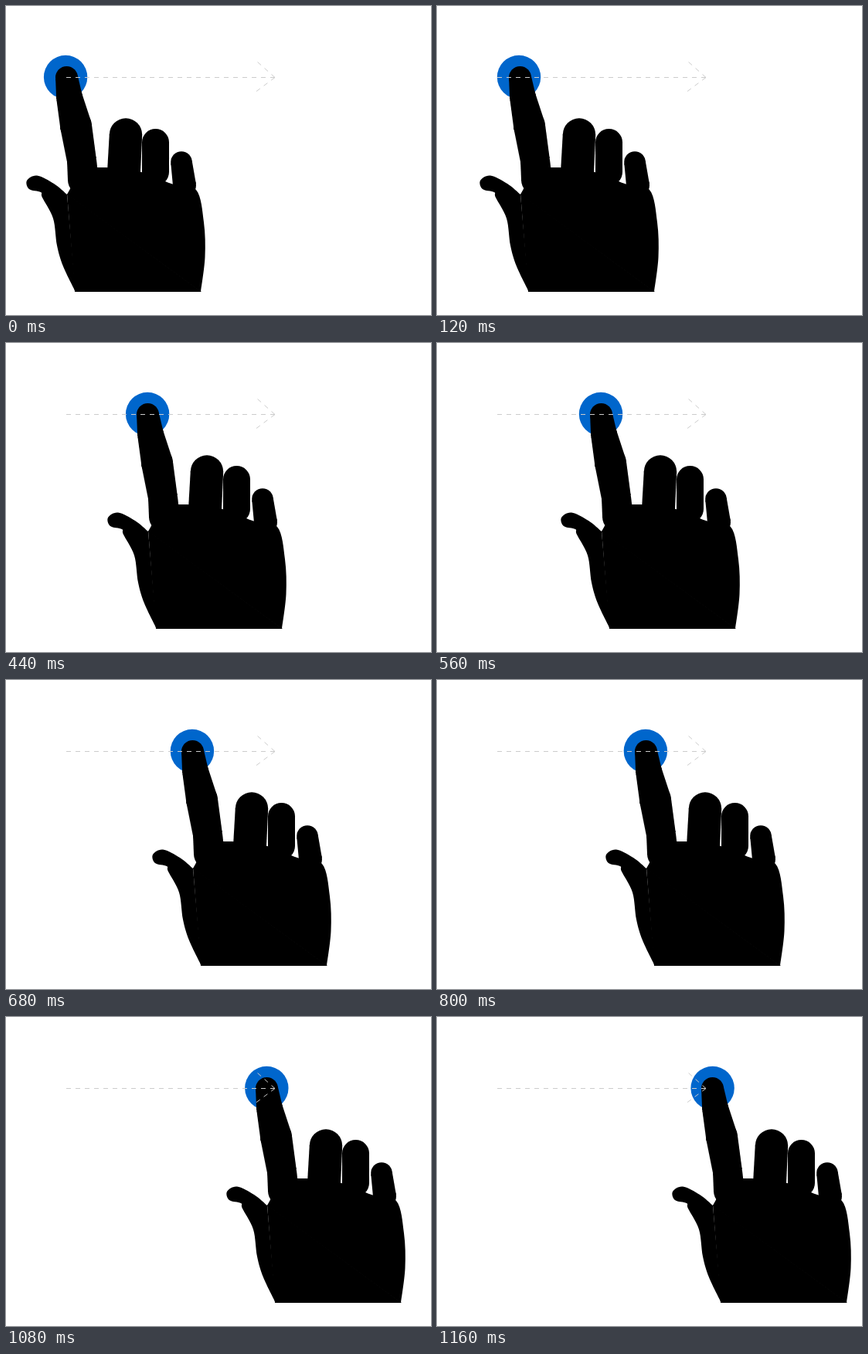
Animation, 550 px wide and 400 px high, one loop 1200 ms. Source, as an HTML page with a canvas:

```html
<!DOCTYPE html>
<html lang="en">
<head>
<meta charset="utf-8">
<title>Swipe right</title>
<style>
  html, body { margin: 0; width: 100%; height: 100%; overflow: hidden; background: #fff; }
  canvas { display: block; }
</style>
</head>
<body>
<canvas id="stage" width="550" height="400"></canvas>
<script>
const ctx = document.getElementById('stage').getContext('2d');
const LOOP = 1200, STEP = 40, LAST = LOOP / STEP - 1;

function disc(x, y, r) {
  ctx.beginPath();
  ctx.arc(x, y, r, 0, Math.PI * 2);
  ctx.fill();
}

// Tapered round-ended limb through joints [x, y, radius]
function limb(...joints) {
  joints.forEach(([x, y, r], i) => {
    disc(x, y, r);
    if (!i) return;
    const [px, py, pr] = joints[i - 1];
    const len = Math.hypot(x - px, y - py);
    const nx = (py - y) / len, ny = (x - px) / len;
    ctx.beginPath();
    ctx.moveTo(px + nx * pr, py + ny * pr);
    ctx.lineTo(x + nx * r, y + ny * r);
    ctx.lineTo(x - nx * r, y - ny * r);
    ctx.lineTo(px - nx * pr, py - ny * pr);
    ctx.fill();
  });
}

// Smooth closed shape through a few key points
function blob(...pts) {
  const at = i => pts[Math.max(0, Math.min(pts.length - 1, i))];
  ctx.beginPath();
  ctx.moveTo(...pts[0]);
  for (let i = 0; i < pts.length - 1; i++) {
    const [a, b, c, d] = [at(i - 1), at(i), at(i + 1), at(i + 2)];
    ctx.bezierCurveTo(
      b[0] + (c[0] - a[0]) / 6, b[1] + (c[1] - a[1]) / 6,
      c[0] - (d[0] - b[0]) / 6, c[1] - (d[1] - b[1]) / 6,
      c[0], c[1]
    );
  }
  ctx.fill();
}

function drawHand() {
  ctx.fillStyle = '#000';
  limb([78.5, 92.5, 14.5], [82, 118, 17], [90.5, 155, 20.5], [98, 200, 19], [100, 225, 20]); // index
  limb([155, 166.5, 21.2], [152.5, 215, 21.5]);                 // middle
  limb([193.5, 176.5, 17.5], [193.5, 215, 17.5]);               // ring
  limb([227, 202, 13.8], [231, 232, 15]);                       // little
  // thumb and palm
  blob([90, 370], [74, 337], [66, 310], [61, 275], [47, 248], [45, 241],
       [30, 237], [27, 226], [40, 219.5], [62, 230], [79, 244]);
  blob([79, 244], [98, 215], [124, 209], [175, 215], [214, 230], [246, 238],
       [256, 280], [257.5, 325], [252, 370]);
  ctx.beginPath();
  ctx.moveTo(79, 243);
  ctx.lineTo(253, 370);
  ctx.lineTo(89, 370);
  ctx.fill();
}

function dashed(x1, y1, x2, y2) {
  ctx.beginPath();
  ctx.moveTo(x1, y1);
  ctx.lineTo(x2, y2);
  ctx.stroke();
}

function drawArrow() {
  ctx.strokeStyle = '#ccc';
  ctx.setLineDash([6, 6]);
  dashed(78, 92.5, 348, 92.5);
  dashed(348, 92.5, 325, 72);
  dashed(348, 92.5, 324, 110.5);
}

function draw(now) {
  const k = Math.floor((now % LOOP) / STEP) / LAST;
  ctx.fillStyle = '#fff';
  ctx.fillRect(0, 0, 550, 400);

  ctx.fillStyle = '#06c';
  disc(77.1 + 279.5 * k, 92, 28.2);

  ctx.save();
  ctx.translate(Math.round(278 * k), 0);
  ctx.beginPath();
  ctx.rect(0, 0, 550, 370);
  ctx.clip();
  drawHand();
  ctx.restore();

  drawArrow();
}

const start = performance.now();
function tick() {
  draw(performance.now() - start);
  requestAnimationFrame(tick);
}
tick();
</script>
</body>
</html>
```
